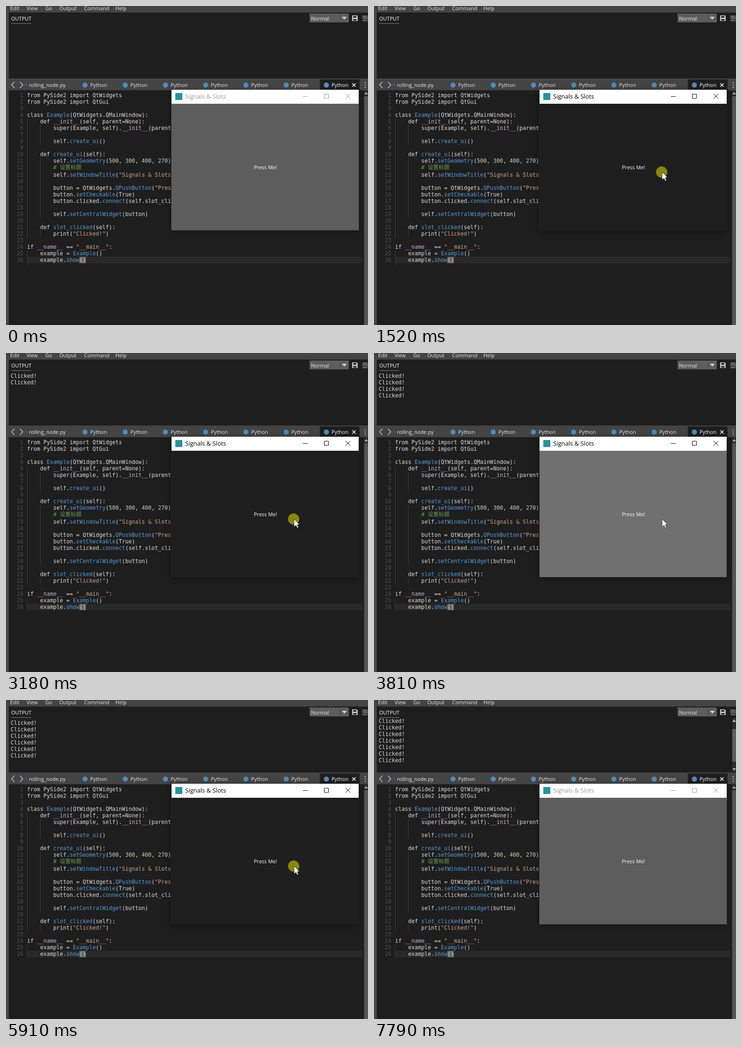
An HTML page for the animation above (7.87 s loop, 774x682 px).

```html
<!DOCTYPE html>
<html lang="en">
<head>
<meta charset="utf-8">
<title>Signals & Slots</title>
<style>
  html, body { margin: 0; width: 100%; height: 100%; overflow: hidden; background: #1e1e1e; }
  svg { display: block; width: 774px; height: 682px; }
  text { font: 11px "Open Sans", "Noto Sans", sans-serif; fill: #e8e8e8; white-space: pre; }
  .code { font: 11.63px "DejaVu Sans Mono", "Noto Sans CJK SC", monospace; fill: #dcdcdc; }
  .num { fill: #4c4c4c; text-anchor: end; }
  .call { fill: #569cd6; }
  .magic { fill: #c3b0cf; }
  .str { fill: #cfa38c; }
  .note { fill: #6a9955; }
  .int { fill: #c4d2b4; }
  .line { fill: none; stroke: #c8c8c8; }
  .bright { fill: #fff; }
  #title { font-size: 13px; }
  #active { filter: drop-shadow(0 2px 7px rgba(0,0,0,.4)); }
  #idle { filter: drop-shadow(0 1px 4px rgba(0,0,0,.35)); }
</style>
</head>
<body>
<svg viewBox="0 0 774 682">
  <defs><clipPath id="view"><rect x="6" y="38" width="760" height="115"/></clipPath></defs>
  <rect width="774" height="682" fill="#1e1e1e"/>
  <path d="M0 0H774V14H6V155H774V180H6V682H0Z" fill="#444"/>
  <g id="menu"></g>

  <text x="11" y="31" class="bright">OUTPUT</text>
  <path d="M11 37.5H54" class="line" stroke-opacity=".6"/>
  <rect x="649" y="16" width="84" height="19" rx="1" fill="#5d5d5d"/>
  <path d="M713.5 16V35" stroke="#4a4a4a"/>
  <text x="652" y="31">Normal</text>
  <path d="M718 23H729L723.5 29Z" fill="#d0d0d0"/>
  <path d="M740 20H750L752 22V32H740ZM742.5 21.5V25H749V21.5ZM742.5 28V31H749.5V28Z" fill="#c4c4c4" fill-rule="evenodd"/>
  <path d="M762 21.5H773M762 24.5H768M762 27.5H768M762 31.5H773M767 22L775 30M775 22L767 30" class="line"/>
  <g id="log" clip-path="url(#view)"></g>
  <g id="bar">
    <rect x="766" y="38" width="8" height="115" fill="#2b2b2b"/>
    <path d="M766 47H774L770 41ZM766 146H774L770 151Z" fill="#aaa"/>
    <rect id="thumb" x="766" width="8" fill="#5d5d5d"/>
  </g>

  <rect x="671" y="157" width="85" height="23" fill="#1e1e1e"/>
  <path d="M18 162L12 168.5L18 175M30 162L36 168.5L30 175" class="line" stroke-width="1.4"/>
  <path d="M42 166Q44.5 169 42 172Z" fill="#4f8bb8"/>
  <text x="49" y="173">rolling_node.py</text>
  <g id="tabs"></g>
  <path d="M740.5 165.5L747.5 172.5M747.5 165.5L740.5 172.5" stroke="#fff" stroke-width="1.6"/>
  <path d="M767 163h2v2h-2zM767 168h2v2h-2zM767 173h2v2h-2z" fill="#ccc"/>

  <rect x="45" y="536" width="717" height="14" fill="#282828"/>
  <rect x="157" y="536" width="14" height="14" fill="#65655c"/>
  <path d="M45.5 240V495M73.5 254V297M73.5 324V453M73.5 480V495M45.5 522V554" stroke="#3b3b3b"/>
  <g id="code"></g>
  <rect x="765" y="180" width="9" height="502" fill="#2b2b2b"/>
  <path d="M766 189H774L770 184Z" fill="#aaa"/>
  <rect x="766" y="193" width="8" height="489" fill="#555"/>

  <rect id="active" x="353.5" y="179.5" width="401" height="300" fill="#1e1e1e" stroke="#242424"/>
  <rect id="idle" x="353.5" y="179.5" width="401" height="300" fill="#1e1e1e" stroke="#3c3c3c"/>
  <rect x="354" y="179" width="400" height="30" fill="#fff"/>
  <rect x="362" y="186" width="15" height="15" fill="#2b929e"/>
  <text id="title" x="383" y="198">Signals &amp; Slots</text>
  <path id="buttons" d="M635 193.5H645M680.5 188.5H689.5V197.5H680.5ZM726 188L736 198M736 188L726 198" fill="none"/>
  <rect id="press" x="354" y="209" width="400" height="270"/>
  <text x="530" y="349" class="bright">Press Me!</text>
  <circle id="halo" cx="615" cy="355" r="12" fill="#8a860e"/>
  <path id="mouse" d="M0 0V17L4 13.3L6.6 19L9.2 18L6.7 12H11.5Z" fill="#fff" stroke="#111" stroke-width=".7"/>
</svg>
<script>
const LOOP = 7870;
const clicks = [[1520, 1620], [2390, 2470], [3080, 3200], [3750, 3810],
                [4290, 4390], [4890, 4990], [5910, 6010], [6740, 6800]];
const source = `from PySide2 import QtWidgets
from PySide2 import QtGui

class Example(QtWidgets.QMainWindow):
    def __init__(self, parent=None):
        super(Example, self).__init__(parent)

        self.create_ui()

    def create_ui(self):
        self.setGeometry(500, 300, 400, 270)
        # 设置标题
        self.setWindowTitle("Signals &amp; Slots")

        button = QtWidgets.QPushButton("Press Me!")
        button.setCheckable(True)
        button.clicked.connect(self.slot_clicked)

        self.setCentralWidget(button)

    def slot_clicked(self):
        print("Clicked!")

if __name__ == "__main__":
    example = Example()
    example.show()`;

const $ = id => document.getElementById(id);
const text = (x, y, s, cls = "") => `<text x="${x}" y="${y}" class="${cls}">${s}</text>`;
const show = (id, on) => $(id).setAttribute("visibility", on ? "visible" : "hidden");
const set = (id, attrs) => { for (const k in attrs) $(id).setAttribute(k, attrs[k]); };

// Syntax colours; the group name is the class, builtins stay plain
const tokens = /(?<note>#.*)|(?<str>"[^"]*")|(?<magic>__\w+__)|(?<call>\b(?!super|print)\w+(?=\())|(?<int>\b\d+\b)/g;
function paint(line) {
  return line.replace(tokens, (s, ...rest) => {
    const groups = rest.at(-1);
    return `<tspan class="${Object.keys(groups).find(k => groups[k])}">${s}</tspan>`;
  });
}

$("menu").innerHTML = [[9, "Edit"], [44, "View"], [84, "Go"], [114, "Output"], [167, "Command"], [234, "Help"]]
  .map(([x, s]) => text(x, 9, s)).join("");

$("tabs").innerHTML = Array.from({length: 7}, (_, i) =>
  `<circle cx="${169 + 86 * i}" cy="169" r="5.5" fill="#4f8bb8"/>` +
  text(180 + 86 * i, 173, "Python", i === 6 ? "bright" : "")).join("");

$("code").innerHTML = source.split("\n").map((line, i) => {
  const y = 195 + 14 * i + (i > 11 ? 2 : 0);   // the CJK row is taller
  return text(37, y, i + 1, "code num") + text(45, y, paint(line), "code");
}).join("");

$("log").innerHTML = clicks.map((_, i) => `<g id="log${i}">${text(10, 53 + 14 * i, "Clicked!", "code")}</g>`).join("");

// Pointer tip at time t, or null while it is outside the stage
function pointer(t) {
  if (t < 350 || t >= 7550) return null;
  const at = (from, span) => Math.floor((t - from) / 20) * 20 / span;
  if (t < 1130) {
    const s = at(350, 780) ** 1.3;
    return [756 - 145 * s - 78 * s * (1 - s), 684 - 322 * s];
  }
  if (t < 7090) {
    const s = Math.min(1, Math.max(0, at(1130, 80)));
    return [611 + 5 * s, 362 - 7 * s];
  }
  const s = at(7070, 480) ** 1.5;
  return [616 + 130 * s + 39 * s * (1 - s), 355 + 327 * s];
}

function draw(t) {
  const tip = pointer(t);
  const held = clicks.some(([down, up]) => t >= down && t < up);
  const count = clicks.filter(c => t >= c[1]).length;
  const focus = t >= 1520 && t < 7790;
  const scroll = t >= 6820 ? 18 : t >= 6030 ? 4 : 0;

  show("mouse", tip);
  if (tip) set("mouse", {transform: `translate(${tip.map(Math.round)})`});
  show("halo", held);
  const hover = tip && tip[1] < 479;
  set("press", {fill: held || count % 2 ? "#1e1e1e" : hover ? "#707070" : "#5d5d5d"});

  show("active", focus);
  show("idle", !focus);
  $("title").style.fill = focus ? "#000" : "#999";
  set("buttons", {stroke: focus ? "#000" : "#999"});

  clicks.forEach((_, i) => {
    show("log" + i, i < count);
    set("log" + i, {transform: `translate(0 ${-scroll})`});
  });
  show("bar", scroll);
  const top = scroll > 4 ? 62 : 52;
  set("thumb", {y: top, height: 132 - top});
}

const start = performance.now();
function tick() {
  draw((performance.now() - start) % LOOP);
  requestAnimationFrame(tick);
}
tick();
</script>
</body>
</html>
```
